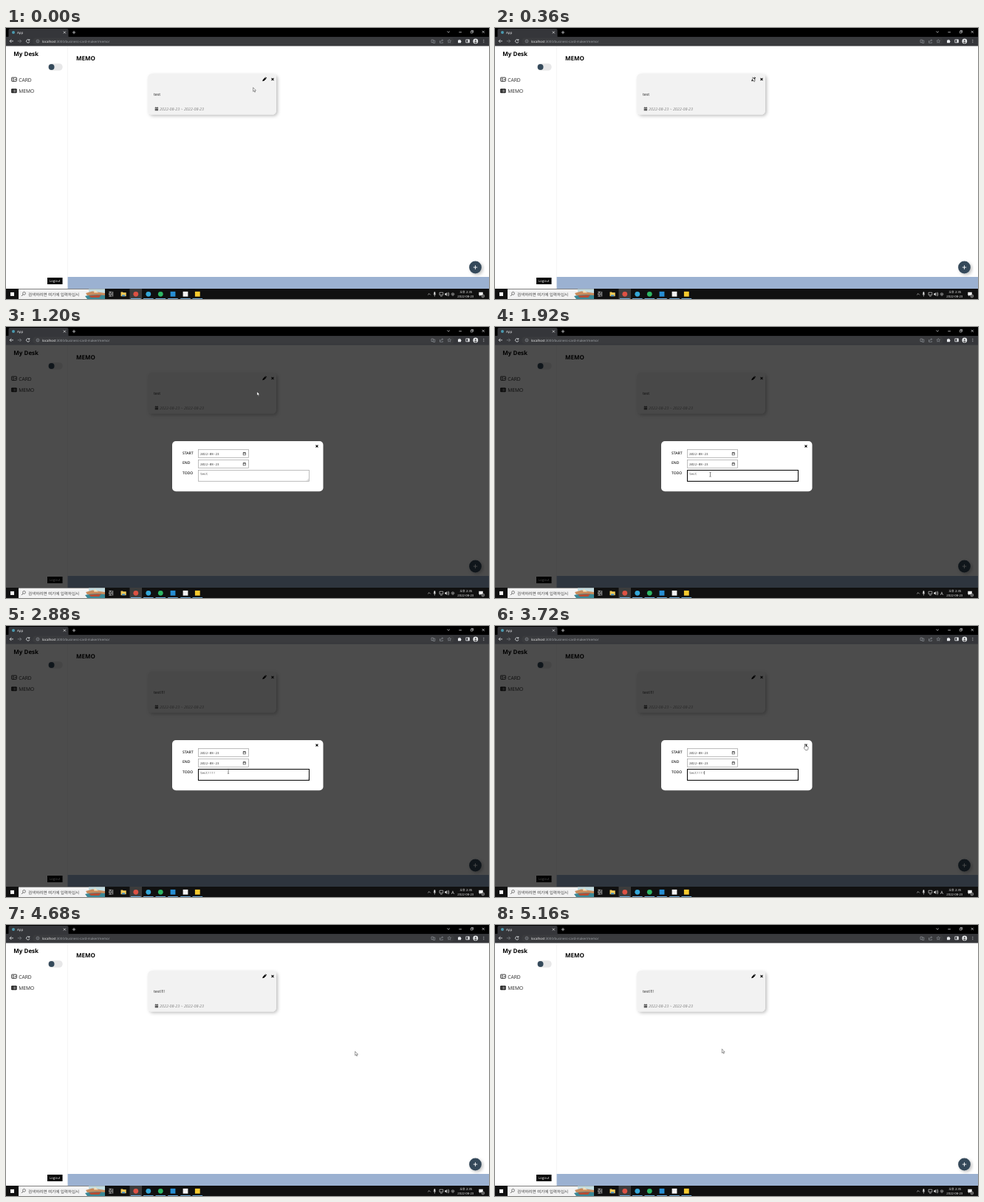
These frames come from a looping animation (654x368 px, 5.28 s). An HTML page:

```html
<!DOCTYPE html>
<html lang="ko">
<head>
<meta charset="utf-8">
<title>Memo</title>
<style>
html, body { margin: 0; width: 100%; height: 100%; overflow: hidden; background: #fff; }
svg { display: block; width: 100vw; height: 100vh; stroke-width: .8; }
text { font-family: "Open Sans", "Noto Sans CJK KR", sans-serif; text-rendering: geometricPrecision; white-space: pre; }
.bold { font-weight: 700; }
.mono { font: 4.25px "Noto Sans Mono", monospace; fill: #444; }
.line { fill: none; stroke: currentColor; }
.field { fill: #fff; stroke: #a2a2a2; stroke-width: .7; }
</style>
</head>
<body>
<svg viewBox="0 0 654 368" preserveAspectRatio="none">
  <defs>
    <filter id="shadow" x="-20%" y="-30%" width="140%" height="160%">
      <feDropShadow dx="2" dy="2" stdDeviation="1.9" flood-opacity=".25"/>
    </filter>
    <path id="cross" d="M-1.5-1.5 1.5 1.5M1.5-1.5-1.5 1.5" fill="none" stroke="currentColor"/>
    <g id="calendar" stroke-width=".5">
      <rect x="-1.7" y="-1.4" width="3.4" height="3.1" class="line"/>
      <path d="M-1.7-1h3.4M-1-2.1v.8M1-2.1v.8" class="line"/>
    </g>
  </defs>

  <!-- page -->
  <rect width="654" height="368" fill="#fff"/>
  <path d="M83.5 24.5V338" stroke="#f3f3f3" stroke-width=".8"/>
  <rect x="83.5" y="338" width="571" height="17" fill="#9bb1d1"/>
  <text class="bold" x="10.3" y="37.8" font-size="8">My Desk</text>
  <text class="bold" x="95" y="44.3" font-size="8">MEMO</text>
  <rect x="57" y="48.2" width="19.7" height="9.6" rx="4.8" fill="#e7e7e8"/>
  <circle cx="61.6" cy="53" r="3.9" fill="#34495a"/>
  <g font-size="6.7" fill="#222">
    <text x="17.2" y="72.5">CARD</text>
    <text x="17.2" y="88">MEMO</text>
  </g>
  <g color="#111">
    <rect x="7.6" y="67.2" width="6.8" height="5.2" rx=".7" class="line"/>
    <circle cx="9.8" cy="69.1" r=".8"/>
    <path d="M8.6 71.6q1.2-2 2.4 0zM11.7 69h1.8v.5h-1.8zM11.7 70.4h1.8v.5h-1.8z"/>
    <rect x="7.2" y="82.5" width="7.4" height="5.8" rx=".8"/>
    <path d="M8.3 84.1h.8m.7 0h3.7M8.3 85.5h.8m.7 0h3.7M8.3 86.9h.8m.7 0h3.7" stroke="#fff" stroke-width=".6"/>
  </g>
  <rect x="56" y="339" width="20.5" height="9" fill="#000"/>
  <text x="58.7" y="345.2" font-size="4.6" fill="#fff">Logout</text>

  <rect x="192" y="62" width="174" height="55.5" rx="5.5" fill="#f2f2f2" filter="url(#shadow)"/>
  <path d="M347.2 72.3l.6-2.1 2.9-2.9 1.6 1.6-2.9 2.9zM351.1 66.9l.6-.5 1.6 1.6-.6.5z"/>
  <use href="#cross" x="361" y="69.6" stroke-width="1.1"/>
  <text id="memo" x="200" y="92.1" font-size="5.3" fill="#222"></text>
  <path d="M201.7 108h4.4v1h-4.4zM201.7 109.4h4.4v2.8h-4.4zM202.4 107h.8v1h-.8zM204.6 107h.8v1h-.8z" fill="#555"/>
  <text x="208" y="111.7" font-size="5.4" font-style="italic" fill="#828282">2022-08-23 ~ 2022-08-23</text>

  <circle cx="635.5" cy="325" r="8.4" fill="#34495a" filter="url(#shadow)"/>
  <path d="M632.8 325h5.4M635.5 322.3v5.4" stroke="#fff" stroke-width=".9"/>

  <!-- edit dialog -->
  <g id="dialog">
    <rect width="654" height="368" fill="#000" opacity=".7"/>
    <rect x="225" y="155" width="204.5" height="68.3" rx="5" fill="#fff"/>
    <use href="#cross" x="421" y="161.8" stroke-width="1.1"/>
    <g font-size="5" font-weight="600" fill="#222">
      <text x="239" y="172.5">START</text>
      <text x="239" y="186.4">END</text>
      <text x="239" y="200.1">TODO</text>
    </g>
    <rect class="field" x="260.5" y="166.5" width="68" height="11"/>
    <rect class="field" x="260.5" y="180.5" width="68" height="11"/>
    <text class="mono" x="263" y="173.6">2022-08-23</text>
    <text class="mono" x="263" y="187.6">2022-08-23</text>
    <use href="#calendar" x="322.8" y="172.2"/>
    <use href="#calendar" x="322.8" y="186.2"/>
    <rect id="area" class="field" x="260.5" y="194.5" width="150" height="15"/>
    <path d="M407.4 208.9l2.4-2.4M408.9 208.9l.9-.9" stroke="#777" stroke-width=".4"/>
    <text id="todo" class="mono" x="263" y="200.9"></text>
    <path id="caret" d="M0 197v4.6" stroke="#000" stroke-width=".5"/>
  </g>

  <!-- browser -->
  <rect width="654" height="13" fill="#000"/>
  <path d="M2 13q1.5 0 1.5-2V3q0-2 2-2h77q2 0 2 2v8q0 2 1.5 2z" fill="#35363a"/>
  <rect y="12" width="654" height="12.5" fill="#35363a"/>
  <rect x="36" y="13.2" width="571" height="9.8" rx="4.9" fill="#3a3b3e"/>
  <circle cx="10" cy="6" r="2" fill="#4a9bb0"/>
  <text x="15" y="7.7" font-size="4.5" fill="#e8eaed">App</text>
  <text x="49" y="19.6" font-size="4.45" fill="#a5a9ae"><tspan fill="#fff">localhost</tspan>:3000/business-card-maker/memo/</text>
  <g color="#e8eaed">
    <use href="#cross" x="79.3" y="6" stroke-width=".7"/>
    <use href="#cross" x="646.3" y="5.3" stroke-width=".7"/>
    <path class="line" d="M89.8 6h4.4M92 3.8v4.4M597.5 4.5l1.7 1.7 1.7-1.7M613.3 5.7h3.6" stroke-width=".7"/>
    <path class="line" d="M629.3 4.4h2.5v2.5h-2.5zM630.2 4.2v-.8h2.5v2.5h-.7" stroke-width=".6"/>
    <path class="line" d="M10 17.8H5.2M7.3 15.6l-2.2 2.2 2.2 2.2M31.4 16.4a2.2 2.2 0 1 0 .5 2M31.8 15v1.8H30"/>
    <path class="line" d="M27.6 17.8h4.8M30.3 15.6l2.2 2.2-2.2 2.2" transform="translate(-11.8)" color="#7d8085"/>
    <g color="#9aa0a6" stroke-width=".6">
      <circle class="line" cx="43" cy="17.9" r="2"/>
      <path class="line" d="M43 17.5v1.4M43 16.6v.5M576 16h2.6v3.6H576zM579 17h1.8v3.4h-2.6M587.5 17.2v3h4v-1M588.6 18.6q.3-2 2.8-2M590.4 15.4l1.3 1.2-1.3 1.3"/>
      <path class="line" d="M600.3 15.5l.7 1.6 1.7.2-1.3 1.1.4 1.7-1.5-.9-1.5.9.4-1.7-1.3-1.1 1.7-.2z" stroke-width=".5"/>
    </g>
    <path d="M612 16.4h1.4q.5-2 1.4 0h1.2v1.4q1.6.5 0 1.2v1.3h-4z" fill="#e8eaed"/>
    <path class="line" d="M622.8 15.8h4.5v4h-4.5z"/>
    <path d="M625.4 15.8h2v4h-2z" fill="#e8eaed"/>
    <circle cx="635.8" cy="17.9" r="3.4" fill="#e8eaed"/>
    <path d="M633.7 19.8q2.1-2.6 4.2 0l-2.1 1z" fill="#555"/>
    <circle cx="635.8" cy="17" r="1.1" fill="#555"/>
    <path d="M646.8 15.7v.8m0 1v.8m0 1v.8" stroke="#e8eaed" stroke-width=".8"/>
  </g>

  <!-- taskbar -->
  <rect y="354" width="654" height="14" fill="#101010"/>
  <rect x="6" y="358.9" width="5" height="5" fill="#fff"/>
  <rect x="17" y="354.5" width="117" height="13.5" fill="#f3f3f3"/>
  <g color="#333">
    <circle class="line" cx="24.5" cy="360.4" r="1.9" stroke-width=".6"/>
    <path class="line" d="M23.1 361.8l-2 2.2" stroke-width=".7"/>
  </g>
  <text x="30" y="363.6" font-size="5.55" fill="#444">검색하려면 여기에 입력하십시</text>
  <path d="M112 354.5h22V368h-22q-6-5 0-8z" fill="#c3dde2"/>
  <path d="M108 360l9-2.5 17 2.5v3h-24z" fill="#c98b5c"/>
  <path d="M107 364q12-3 27-1v5h-24z" fill="#3a8795"/>
  <path d="M112 363.5l17-1-3 3.5h-11z" fill="#b74c32"/>
  <path d="M120 355.5l5 4h-6z" fill="#f2dfba"/>
  <rect x="167.5" y="354" width="16.5" height="14" fill="#3c3c3c"/>
  <g color="#eee">
    <path class="line" d="M139.8 360h3v2.6h-3zM139.4 358.4h3.8M139.4 364.3h3.8M144.6 358v6.6" stroke-width=".7"/>
  </g>
  <path d="M155.5 358.5h2.5l.7.8h4v5h-7.2z" fill="#f4cc58"/>
  <path d="M157 362.4h4.2v1.9H157z" fill="#4695d0"/>
  <g id="apps"></g>
  <g color="#eee" stroke-width=".6">
    <path class="line" d="M571.2 362.4l1.8-1.8 1.8 1.8M578.7 361.4q1.7 3 3.4 0M580.4 363v1.5M587 359.2h4.8v3.4H587zM588 364.2h2.8M597.7 359.5q1.5 2 0 4M599 358.7q2 2.8 0 5.6"/>
    <rect x="579.5" y="358.2" width="1.8" height="4" rx=".9" fill="#eee"/>
    <path d="M594.3 360.5h1l1.4-1.3v4.6l-1.4-1.3h-1z" fill="#eee"/>
    <g id="gear"><circle class="line" cx="605" cy="361.5" r="1.9" stroke-dasharray="1 .5"/><circle class="line" cx="605" cy="361.5" r=".8"/></g>
    <path d="M640.3 358.8h5.5v4.2h-3.2l-1.2 1.4V363h-1.1z" fill="#eee"/>
    <circle cx="645.8" cy="364" r="2" fill="#555" stroke="#eee" stroke-width=".4"/>
  </g>
  <g fill="#f2f2f2" text-anchor="middle">
    <text id="latin" x="605" y="363.7" font-size="6">A</text>
    <text x="622.7" y="359.8" font-size="4.2">오후 2:35</text>
    <text x="622.3" y="365.9" font-size="4.2">2022-08-23</text>
  </g>

  <!-- pointers -->
  <g id="pointer" stroke-linejoin="round">
    <path id="arrow" d="M0 0v5.4l1.2-1.1.9 2 .9-.4-.9-1.9h1.7z" fill="#fff" stroke="#222" stroke-width=".45"/>
    <path id="beam" d="M-1.1-3h.8l.3.3.3-.3h.8M0-2.7v5.4M-1.1 3h.8l.3-.3.3.3h.8" fill="none" stroke="#333" stroke-width=".6"/>
    <path id="hand" d="M-.7 4.2V.5q.7-1 1.4 0v2.2l2.6.6q.7.2.6 1l-.5 2.8q-.2.8-1 .8H.2L-2 5q0-1.2 1.3-.8z" fill="#fff" stroke="#222" stroke-width=".5"/>
  </g>
</svg>
<script>
const LOOP = 5280, TICK = 120;
const OPEN = 600, FOCUS = 1680, BLUR = 4440, CLOSE = 4680;
const KEYS = [2400, 2460, 2520, 2760];   // one "!" each
const PATH = [                           // time, x, y of the pointer
  [0, 334.6, 80.8], [120, 334.6, 80.8], [360, 348.8, 66.8], [1080, 348.8, 66.8],
  [1560, 291.5, 200.2], [2760, 291.5, 200.2], [3480, 420.3, 160.6], [3960, 420.3, 160.6],
  [4440, 472.7, 171.7], [4680, 472.7, 171.7], [5160, 307.3, 168.4], [LOOP, 307.3, 168.4]
];
const APPS = [["#dd5144", 175.8, 1], ["#35a7d8", 192.8, 1], ["#2fb765", 209.3, 1],
  ["#278ed3", 226, 0], ["#f2f2f2", 243, 0], ["#f7ca2e", 259.3, 0]];

const $ = id => document.getElementById(id);
const show = (id, on) => $(id).setAttribute("visibility", on ? "inherit" : "hidden");
const within = (t, from, to) => t >= from && t < to;

$("apps").innerHTML = APPS.map(([color, x, round]) =>
  `<rect x="${x - 3.4}" y="357.9" width="6.8" height="6.8" rx="${round ? 3.4 : 0}" fill="${color}"/>
   <rect x="${x - 6.8}" y="367.1" width="13.6" height=".9" fill="#76b9ed"/>`).join("");

function pointerAt(t) {
  const i = PATH.findIndex(p => p[0] > t);
  const [a, ax, ay] = PATH[i - 1], [b, bx, by] = PATH[i];
  const u = (t - a) / (b - a), e = u * u * (3 - 2 * u);
  return [ax + (bx - ax) * e, ay + (by - ay) * e];
}

function draw(t) {
  const open = within(t, OPEN, CLOSE), focused = within(t, FOCUS, BLUR);
  const note = "test" + "!".repeat(KEYS.filter(k => k <= t).length);
  $("memo").textContent = $("todo").textContent = note;
  show("dialog", open);
  $("area").style.stroke = focused ? "#111" : "";
  $("area").style.strokeWidth = focused ? 1.1 : "";
  show("caret", open && focused && Math.floor((t - FOCUS) / 530) % 2);
  $("caret").setAttribute("transform", `translate(${263.2 + note.length * 2.55})`);

  const typing = within(t, FOCUS, CLOSE);
  show("latin", typing);
  show("gear", !typing);

  const [x, y] = pointerAt(t);
  const beam = open && within(x, 261, 410) && within(y, 195, 209);
  const hand = open && Math.hypot(x - 421, y - 161.8) < 3;
  $("pointer").setAttribute("transform", `translate(${x} ${y})`);
  show("beam", beam);
  show("hand", hand);
  show("arrow", !beam && !hand);
}

const start = performance.now();
function frame() {
  const t = (performance.now() - start) % LOOP;
  draw(Math.floor(t / TICK) * TICK);
  requestAnimationFrame(frame);
}
frame();
</script>
</body>
</html>
```
